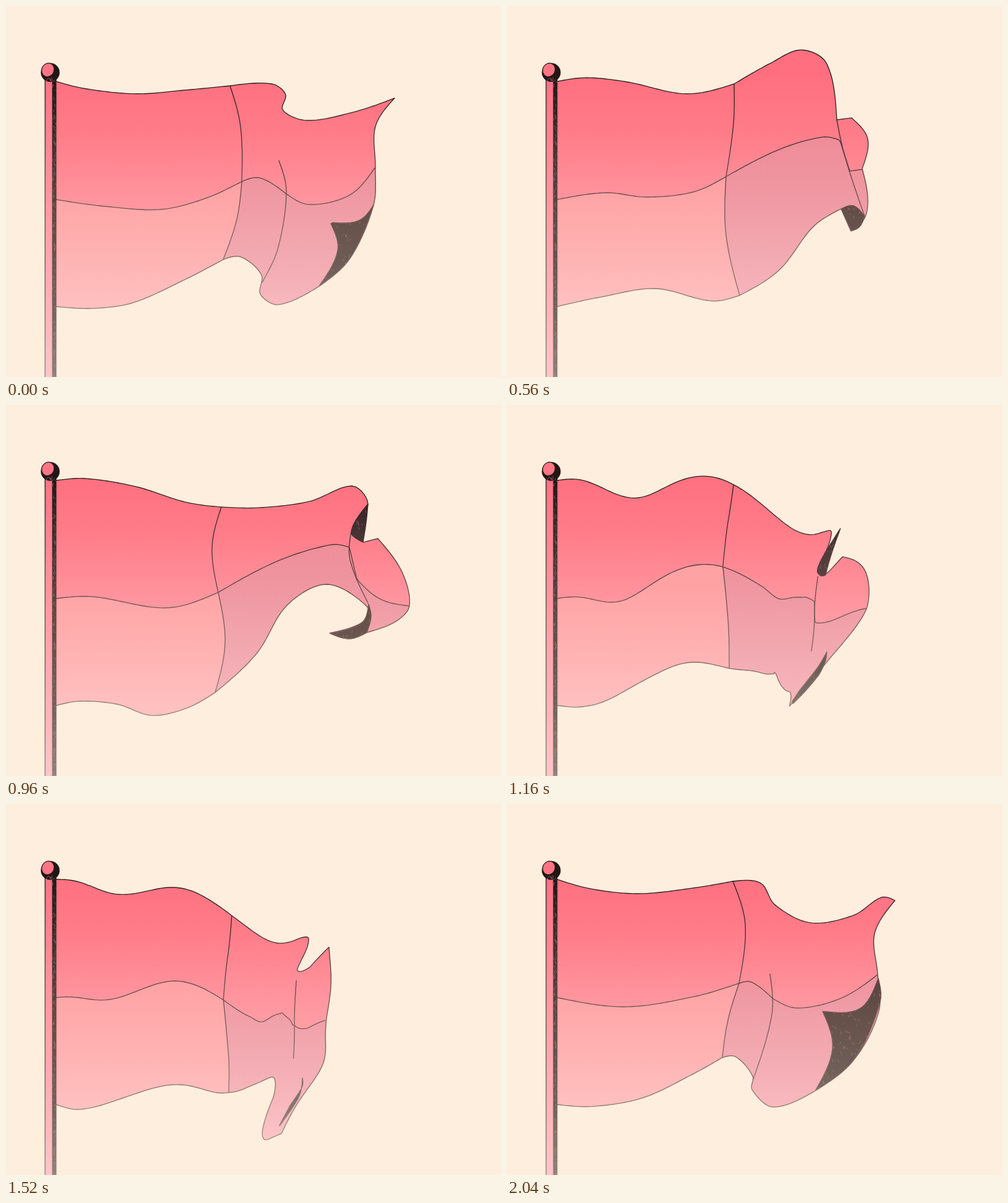
An HTML page with a canvas for the animation above (2.08 s loop, 800 by 600 pixels).

```html
<!DOCTYPE html>
<html lang="en">
<head>
<meta charset="utf-8">
<title>Waving flag</title>
<style>
html, body { margin: 0; width: 100%; height: 100%; overflow: hidden; background: #feeedd; }
canvas { display: block; }
</style>
</head>
<body>
<canvas id="stage" width="800" height="600"></canvas>
<script>
const ctx = document.getElementById('stage').getContext('2d');
const LOOP = 2080, STEP = 40, WAVE = 350, TAU = 2 * Math.PI;

// Key poses: time, wave crest and a few x,y points per edge; a repeated point is a corner.
// Edges: tl/tr top, r right, br/bl bottom, ml/mr cross seam, seam upright, fa/fb folds, d* undersides.
const poses = [
  { t: 0, crest: 420,
    seam: [362,129, 379,195, 381,284, 373,345, 351,410],
    tl: [130,134, 210,142, 290,136],
    tr: [430,126, 452,143, 447,168, 485,185, 560,172, 628,149],
    r: [597,195, 597,262, 594,322, 556,408, 505,454],
    br: [440,483, 411,466, 413,435, 380,406],
    bl: [290,442, 205,480, 140,489],
    ml: [160,324, 250,329, 320,312],
    mr: [410,278, 452,303, 452,303, 490,321, 555,306, 596,262],
    fa: [441,250, 453,300, 440,390, 414,447],
    d1: [594,322, 570,347, 524,350, 524,350, 536,395, 505,454, 505,454, 556,408] },
  { t: 240, crest: 615,
    seam: [344,147, 352,205, 339,314, 338,395, 362,515],
    tl: [175,123, 265,104, 315,116],
    tr: [378,185, 430,194, 505,180, 557,140, 589,156],
    r: [575,275, 575,350, 572,428, 535,470, 478,483],
    br: [497,430, 497,430, 430,481],
    bl: [328,519, 292,494, 278,466, 240,456, 165,472],
    ml: [170,304, 265,292, 310,299],
    mr: [365,328, 420,338, 490,320, 550,287, 575,286],
    fb: [299,354, 298,395, 289,478],
    d1: [572,428, 550,403, 497,430, 497,430, 478,483, 478,483, 545,466] },
  { t: 560, crest: 825,
    seam: [367,126, 366,190, 354,276, 354,370, 376,468],
    tl: [130,116, 195,123, 290,142],
    tr: [425,93, 475,71, 516,92, 533,184, 533,184, 557,181],
    r: [583,215, 574,263, 574,263, 583,310, 578,343, 556,364],
    br: [540,328, 540,328, 495,357, 440,427],
    bl: [330,477, 240,457, 150,471],
    ml: [160,302, 225,309, 300,301],
    mr: [440,232, 510,212, 538,217, 538,217, 554,267, 554,267, 577,264],
    fa: [533,184, 546,243, 578,340],
    d1: [578,340, 560,323, 540,328, 540,328, 556,364, 556,364, 570,357] },
  { t: 960, crest: 1217,
    seam: [348,165, 333,230, 343,303, 354,385, 338,465],
    tl: [130,119, 210,132, 290,157],
    tr: [410,166, 490,156, 560,131, 585,160, 559,202, 577,222, 577,222, 601,216],
    r: [640,270, 652,325, 630,350, 583,368, 583,368, 555,378, 523,369],
    br: [575,352, 587,330, 520,290, 455,323, 405,402],
    bl: [290,491, 235,502, 180,484, 120,479],
    ml: [140,310, 260,328],
    mr: [440,252, 525,226, 555,230, 555,230, 567,282, 567,282, 605,314, 652,325],
    fa: [558,205, 556,250, 585,320],
    d1: [586,322, 575,352, 523,369, 523,369, 555,378, 583,368, 583,368, 590,343],
    d2: [585,160, 558,205, 577,222, 577,222, 582,190] },
  { t: 1320, crest: 1520,
    seam: [364,167, 359,215, 333,276, 335,320, 353,370],
    tl: [125,119, 190,137, 250,163, 310,171],
    tr: [470,155, 512,166, 524,192, 473,238, 485,277, 485,277, 519,274],
    r: [545,345, 532,422, 495,492, 425,543],
    br: [370,515, 368,470, 432,405, 403,360],
    bl: [290,405, 205,473, 120,494],
    ml: [125,307, 200,320, 270,300],
    mr: [395,268, 425,279, 455,274, 475,291, 475,291, 465,378, 465,378, 490,410, 532,422],
    fa: [475,270, 465,378, 441,447],
    fb: [407,254, 411,320, 433,378],
    d1: [483,502, 440,522, 440,522, 428,543, 428,543, 465,527],
    d2: [524,198, 473,238, 486,277, 486,277, 500,238],
    d3: [403,360, 436,392, 378,461, 378,461, 403,405] },
  { t: 1720, crest: 1850,
    seam: [338,201, 332,270, 343,326, 363,400, 356,461],
    tl: [150,137, 245,185, 300,204],
    tr: [450,183, 495,206, 490,237, 490,237, 515,245, 550,237],
    r: [530,295, 514,375, 515,408, 526,470, 494,537, 488,586],
    br: [470,567, 477,550, 477,550, 513,490, 495,461, 445,443],
    bl: [285,493, 205,514, 130,500],
    ml: [115,316, 220,343, 280,338],
    mr: [430,312, 475,317, 492,331, 492,331, 497,362, 497,362, 515,369],
    fa: [488,250, 492,331, 515,408],
    d1: [495,461, 513,490, 477,550, 477,550, 499,505] },
  { t: 2040, crest: 2125,
    seam: [365,125, 385,195, 375,290, 357,350, 348,410],
    tl: [140,138, 215,145, 300,136],
    tr: [410,128, 433,163, 490,192, 560,180, 605,151, 627,156],
    r: [594,210, 599,275, 601,335, 562,412, 498,464],
    br: [430,490, 396,462, 397,440, 370,409],
    bl: [300,437, 220,475, 140,489],
    ml: [190,328, 300,312],
    mr: [395,288, 430,315, 430,315, 470,330, 540,314, 599,276],
    fa: [425,275, 428,340, 398,445],
    d1: [600,282, 570,331, 510,335, 510,335, 526,395, 498,464, 498,464, 562,412, 603,320] }
];

const lerp = (a, b, u) => a + (b - a) * u;
const dist = (a, b) => Math.hypot(b[0] - a[0], b[1] - a[1]);
const mix = (a, b, u) => [lerp(a[0], b[0], u), lerp(a[1], b[1], u)];

// Smooth line through points without corners.
function spline(p) {
  const last = p.length - 1;
  const dir = (a, b, d) => [(b[0] - a[0]) / d, (b[1] - a[1]) / d];
  const m = p.map((q, i) => i > 0 && i < last
    ? dir(p[i - 1], p[i + 1], dist(p[i - 1], q) + dist(q, p[i + 1])) : null);
  const edge = (a, b, inner) => {
    const c = dir(a, b, dist(a, b));
    return inner ? c.map((v, k) => (3 * v - inner[k]) / 2) : c;
  };
  m[0] = edge(p[0], p[1], m[1]);
  m[last] = edge(p[last - 1], p[last], last > 1 ? m[last - 1] : null);
  const out = [];
  for (let i = 0; i < last; i++) {
    const a = p[i], b = p[i + 1], d = dist(a, b) / 3;
    const c1 = [a[0] + m[i][0] * d, a[1] + m[i][1] * d];
    const c2 = [b[0] - m[i + 1][0] * d, b[1] - m[i + 1][1] * d];
    for (let j = 0; j < 20; j++) {
      const u = j / 20, mid = mix(c1, c2, u);
      const l = mix(mix(a, c1, u), mid, u), r = mix(mid, mix(c2, b, u), u);
      out.push(mix(l, r, u));
    }
  }
  return out;
}

// Splits at corners, then spaces n points evenly along the line.
function curve(flat, n = 60) {
  const runs = [[]];
  for (let i = 0; i < flat.length; i += 2) {
    const q = [flat[i], flat[i + 1]], run = runs[runs.length - 1], prev = run[run.length - 1];
    if (prev && dist(prev, q) === 0) runs.push([q]);
    else run.push(q);
  }
  const fine = runs.flatMap(spline);
  fine.push(flat.slice(-2));
  const len = [0];
  for (let i = 1; i < fine.length; i++) len.push(len[i - 1] + dist(fine[i - 1], fine[i]));
  const total = len[len.length - 1], out = [];
  for (let i = 0, j = 1; i <= n; i++) {
    const want = total * i / n;
    while (j < fine.length - 1 && len[j] < want) j++;
    out.push(mix(fine[j - 1], fine[j], (want - len[j - 1]) / (len[j] - len[j - 1])));
  }
  return out;
}

// Edges share their ends with their neighbours and the pole.
function build(p) {
  const top = p.seam.slice(0, 2), cross = p.seam.slice(4, 6), foot = p.seam.slice(8);
  const out = {
    tl: curve([81, 122, ...p.tl, ...top]),
    tr: curve([...top, ...p.tr]),
    r: curve([...p.tr.slice(-2), ...p.r]),
    br: curve([...p.r.slice(-2), ...p.br, ...foot]),
    bl: curve([...foot, ...p.bl, 81, 486]),
    ml: curve([81, 313, ...p.ml, ...cross]),
    mr: curve([...cross, ...p.mr]),
    su: curve(p.seam.slice(0, 6)),
    sd: curve(p.seam.slice(4))
  };
  for (const k of ['fa', 'fb']) if (p[k]) out[k] = curve(p[k]);
  for (const k of ['d1', 'd2', 'd3']) if (p[k]) out[k] = curve([...p[k], ...p[k].slice(0, 2)]);
  return out;
}
const shapes = poses.map(build);

function shrink(pts, w) {
  if (w <= 0) return null;
  const c = [0, 1].map(k => pts.reduce((s, p) => s + p[k], 0) / pts.length);
  return pts.map(p => mix(c, p, w));
}

function poseAt(t) {
  let i = poses.length - 1;
  while (poses[i].t > t) i--;
  const j = (i + 1) % poses.length, p = poses[i], q = poses[j];
  const u = (t - p.t) / ((j ? q.t : LOOP) - p.t);
  const turn = TAU * (q.crest + (j ? 0 : 5 * WAVE) - p.crest) / WAVE;

  // Travelling wave that a straight blend of two poses leaves out.
  const swell = a => Math.cos(a - u * turn) - (1 - u) * Math.cos(a) - u * Math.cos(a - turn);
  const wave = ([x, y]) => {
    const g = Math.min(1, Math.max(0, (x - 81) / 260));
    const amp = 28 * g * g * (3 - 2 * g);
    const a = TAU * (x + 0.28 * (y - 120) - p.crest) / WAVE;
    return [x + amp * 0.25 * swell(a - TAU / 4), y - amp * swell(a)];
  };

  const A = shapes[i], B = shapes[j], out = {};
  for (const k of Object.keys({ ...A, ...B })) {
    let pts;
    if (A[k] && B[k]) pts = A[k].map((a, n) => mix(a, B[k][n], u));
    else pts = A[k] ? shrink(A[k], 1 - 2.5 * u) : shrink(B[k], 2.5 * u - 1.5);
    if (pts) out[k] = pts.map(wave);
  }
  return out;
}

function ramp(stops) {
  const g = ctx.createLinearGradient(0, 0, 0, 600);
  for (const y in stops) g.addColorStop(y / 600, stops[y]);
  return g;
}
const upper = ramp({ 110: '#ff6f7f', 200: '#ff7b88', 320: '#ff969f', 430: '#ffacaf' });
const lower = ramp({ 290: '#ffa2a4', 400: '#ffb2b2', 490: '#ffc1c0' });
const mauve = ramp({ 220: '#ee8d98', 300: '#ef97a2', 360: '#f1a2ab', 450: '#f5b2b8', 550: '#fcc5c7' });
const ink = ramp({ 80: '#1f1414', 220: '#4a3030', 320: '#755454', 480: '#937a72', 600: '#a89890' });
const shade = ramp({ 110: '#241818', 220: '#4a3636', 340: '#655049', 430: '#6f5f58', 530: '#94867e' });
const rod = ramp({ 120: '#ff7183', 350: '#ff9da5', 600: '#ffc5c8' });
const strip = ramp({ 120: '#241818', 320: '#584540', 480: '#6f605a', 600: '#8d807a' });

function random(seed) {
  return () => {
    seed = (seed * 1664525 + 1013904223) >>> 0;
    return seed / 4294967296;
  };
}

function path(pts) {
  ctx.beginPath();
  for (const p of pts) ctx.lineTo(p[0], p[1]);
}
function fill(pts, color) {
  path(pts);
  ctx.fillStyle = color;
  ctx.fill();
}
function stroke(pts) {
  path(pts);
  ctx.stroke();
}
function pen() {
  ctx.strokeStyle = ink;
  ctx.lineWidth = 1.35;
  ctx.lineJoin = ctx.lineCap = 'round';
}

// Short scratches left bare in shaded areas.
function scratch(x, y, w, h, count, seed, alpha) {
  const rnd = random(seed);
  ctx.strokeStyle = `rgba(250,165,165,${alpha})`;
  ctx.lineWidth = 0.8;
  ctx.beginPath();
  for (let i = 0; i < count; i++) {
    const sx = x + rnd() * w, sy = y + rnd() * h;
    ctx.moveTo(sx, sy);
    ctx.lineTo(sx + rnd() * 5 - 2, sy + 1 + rnd() * 4);
  }
  ctx.stroke();
}

function patch(pts, seed) {
  fill(pts, shade);
  ctx.save();
  ctx.clip();
  const xs = pts.map(p => p[0]), ys = pts.map(p => p[1]);
  const x = Math.min(...xs), y = Math.min(...ys);
  const w = Math.max(...xs) - x, h = Math.max(...ys) - y;
  scratch(x, y, w, h, w * h / 130, seed, 0.4);
  ctx.restore();
  pen();
  stroke(pts);
}

function drawFlag(s, seed) {
  const body = [...s.tl, ...s.tr, ...s.r, ...s.br, ...s.bl];
  const end = s.mr[s.mr.length - 1], foot = s.sd[s.sd.length - 1];
  const right = [[800, end[1]], [800, 620]];
  fill(body, upper);
  ctx.save();
  ctx.clip();
  fill([...s.ml, ...s.mr, ...right, [0, 620], [0, 313]], lower);
  fill([...s.mr, ...right, [foot[0], 620], ...s.sd.slice().reverse()], mauve);
  pen();
  stroke([...s.ml, ...s.mr]);
  stroke([...s.su, ...s.sd]);
  for (const k of ['fa', 'fb']) if (s[k]) stroke(s[k]);
  ctx.restore();
  pen();
  stroke(body);
  ['d1', 'd2', 'd3'].forEach((k, i) => {
    if (s[k]) patch(s[k], seed + i * 101);
  });
}

function drawPole() {
  ctx.fillStyle = rod;
  ctx.fillRect(63, 118, 14, 482);
  ctx.fillStyle = strip;
  ctx.fillRect(74.5, 118, 7, 482);
  ctx.fillRect(62.5, 118, 1.3, 482);
  scratch(76, 122, 4, 478, 130, 7, 0.35);

  ctx.fillStyle = '#241516';
  ctx.beginPath();
  ctx.arc(71.5, 107.5, 15.2, 0, TAU);
  ctx.fill();
  ctx.beginPath();
  ctx.ellipse(67.7, 103.4, 10, 11.2, 0.45, 0, TAU);
  ctx.fillStyle = '#ff7585';
  ctx.fill();
  ctx.strokeStyle = '#241516';
  ctx.lineWidth = 1.2;
  ctx.stroke();
  scratch(66, 114, 14, 5, 8, 3, 0.45);
}

function draw(time) {
  const n = Math.floor(time % LOOP / STEP);
  ctx.fillStyle = '#feeedd';
  ctx.fillRect(0, 0, 800, 600);
  drawFlag(poseAt(n * STEP), n * 977 + 13);
  drawPole();
}

const start = performance.now();
function tick() {
  draw(Math.max(0, performance.now() - start));
  requestAnimationFrame(tick);
}
tick();
</script>
</body>
</html>
```
